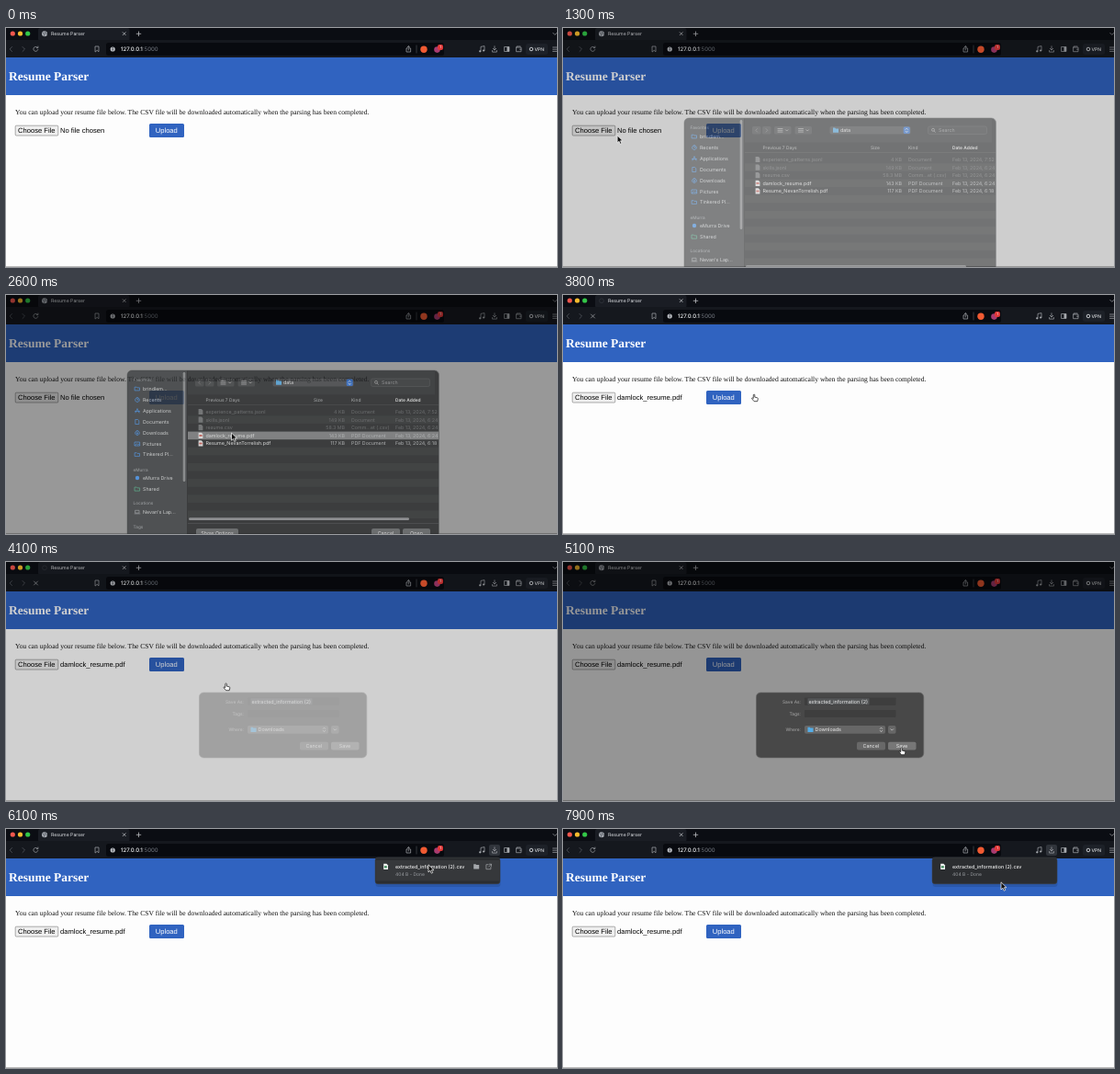
These frames come from a looping animation (600x260 px, 8 s). An HTML page:

```html
<!DOCTYPE html>
<html lang="en">
<head>
<meta charset="utf-8">
<title>Resume Parser</title>
<style>
html, body { margin: 0; width: 100%; height: 100%; overflow: hidden; background: #fdfdfd; }
svg { display: block; width: 600px; height: 260px; }
text { font-family: Inter, Roboto, sans-serif; text-rendering: geometricPrecision; white-space: pre; }
.serif { font-family: "Liberation Serif", serif; }
.arial { font-family: "Liberation Sans", sans-serif; }
.line { fill: none; stroke-linecap: round; stroke-linejoin: round; }
</style>
</head>
<body>
<svg id="stage" viewBox="0 0 600 260"></svg>
<script>
const LOOP = 8000, STEP = 100;

// Drawing helpers: text is placed by its vertical centre.
const attrs = o => Object.entries(o).map(([k, v]) => `${k}="${v}"`).join(' ');
const text = (x, y, str, size, fill, more = {}) =>
  `<text x="${x}" y="${(y + size * .36).toFixed(2)}" font-size="${size}" fill="${fill}" ${attrs(more)}>${str}</text>`;
const rect = (x, y, w, h, fill, rx = 0, more = {}) =>
  `<rect x="${x}" y="${y}" width="${w}" height="${h}" rx="${rx}" fill="${fill}" ${attrs(more)}/>`;
const dot = (x, y, r, fill, more = {}) => `<circle cx="${x}" cy="${y}" r="${r}" fill="${fill}" ${attrs(more)}/>`;
const line = (d, stroke = '#a5a8ad', w = .7) => `<path class="line" d="${d}" stroke="${stroke}" stroke-width="${w}"/>`;
const ring = (x, y, r, stroke, w = .7) => dot(x, y, r, 'none', { stroke, 'stroke-width': w });
const group = (id, body, more = {}) => `<g id="${id}" ${attrs(more)}>${body}</g>`;
const folder = (x, y, fill) => `<path d="M${x} ${y}h2.2l.8 .8h3v4.4h-6z" fill="${fill}"/>`;
const sheet = (x, y, fill) => `<path d="M${x} ${y}h3.2l1.6 1.6v4.6h-4.8z" fill="${fill}"/>`;
const end = { 'text-anchor': 'end' }, mid = { 'text-anchor': 'middle' }, semi = { 'font-weight': 500 };

function browser() {
  const lights = ['#f4574e', '#f8bb2e', '#33c748'].map((c, i) => dot(7.3 + i * 8.2, 6, 2.6, c)).join('');
  const globe = dot(42, 6.3, 3, '#a7abb2') + line('M40 5l2 1.4-.6 2M43 4l-.3 1.4 1.8 1.2', '#454a52', .8);
  const reload = line('M34.3 21.2a2.5 2.5 0 1 0 .5 2.4M34.9 20v1.6h-1.6');
  return rect(0, 0, 600, 14, '#0b0d13') + rect(35, 0, 99.5, 14, '#1a1d24', 2.5) +
    rect(0, 13, 600, 19, '#15181e') + rect(109, 16, 368, 14, '#080a0f', 2.5) + lights +
    group('globe', globe) +
    group('spinner', ring(42, 6.3, 2.4, '#30343b', .8)) +
    text(49, 6.4, 'Resume Parser', 5.2, '#dcdee2') +
    line('M127.2 4.7l3 3m0-3l-3 3M142.2 6.3h4.6m-2.3-2.3v4.6', '#d0d2d6') +
    line('M595.8 5.4l2 2 2-2') +
    line('M6.6 20.5l-2.5 2.5 2.5 2.5M18 20.5l2.5 2.5-2.5 2.5', '#5c6067') +
    group('reload', reload) + group('stop', line('M30.5 21l4 4m0-4l-4 4')) +
    line('M97.4 20h3.6v5.8l-1.8-1.5-1.8 1.5z') +
    dot(116.2, 23, 2.6, '#b8bbc0') + line('M116.2 22.8v1.2m0-2.5v.1', '#14171d', .8) +
    text(125, 23, '127.0.0.1<tspan fill="#70757d" font-weight="400">:5000</tspan>', 6.1, '#eceef0', semi) +
    line('M437 22h-1v4h4.6v-4h-1M438.3 24v-4.2m-1.4 1.2l1.4-1.3 1.4 1.3') +
    line('M447 19v8', '#555961', .6) + dot(455, 23.2, 3.7, '#f05a32') +
    dot(469.5, 23.6, 3.3, '#a83b70') + rect(470, 18, 6, 6, '#e23838', 2) + text(473, 21, '1', 4, '#fff', mid) +
    line('M517 25.2v-4.8l4-.8v4.8') + dot(516.2, 25.3, 1.1, '#a5a8ad') + dot(520.1, 24.5, 1.1, '#a5a8ad') +
    group('downloadActive', rect(526, 17, 12, 12, '#30343b', 2)) +
    line('M532 19.8v4.1m-1.7-1.6l1.7 1.7 1.7-1.7M529.6 24.5v1.6h4.8v-1.6') +
    line('M543 20.5h5v5h-5z') + rect(545.5, 20.5, 2.5, 5, '#a5a8ad') +
    line('M556 21h5v4.7h-5zM556 21v-1h4M559.5 23.2h1.5') +
    rect(566, 17, 24, 12, '#1d2128', 2.5) + ring(572, 23, 1.8, '#c7cacf', 1) +
    text(575.5, 23, 'VPN', 5, '#dfe1e4', semi) + line('M595.5 21h5m-5 2.2h5m-5 2.2h5');
}

function page() {
  const arial = { class: 'arial' };
  return rect(0, 32, 600, 41, '#3063c0') +
    text(3, 52.2, 'Resume Parser', 13.5, '#fff', { class: 'serif', 'font-weight': 700 }) +
    text(10, 91.5, 'You can upload your resume file below. The CSV file will be downloaded automatically when the parsing has been completed.',
      7.6, '#111', { class: 'serif' }) +
    rect(10.2, 106.2, 46.6, 10.8, '#efefef', 1, { stroke: '#767676', 'stroke-width': .6 }) +
    text(13, 111.5, 'Choose File', 7.6, '#000', arial) +
    text(59, 111.5, 'No file chosen', 7.6, '#000', { ...arial, id: 'fileName' }) +
    rect(156, 104, 38, 15, '#3063c0', 1.5) +
    text(174.8, 111.5, 'Upload', 7.6, '#fff', { ...arial, ...mid }) +
    rect(0, 259, 600, 1, '#bcbcbc');
}

const SIDEBAR = [
  ['Favorites', 92.5], ['brindlem...', 102], ['Recents', 114], ['Applications', 126], ['Documents', 138],
  ['Downloads', 150], ['Pictures', 162], ['Tinkered Pl...', 173.5], ['eMurra', 190], ['eMurra Drive', 199],
  ['Shared', 211], ['Locations', 226.5], ["Nevan's Lap...", 236], ['Tags', 252]
];
const HEADINGS = ['Favorites', 'eMurra', 'Locations', 'Tags'];
const ICONS = {
  Recents: 'M0-2.4a2.4 2.4 0 1 0 .01 0M0-1.2V0h1.2',
  Applications: 'M-2 2L0-2.4 2 2M-2.6 .6h5.2',
  Documents: 'M-1.8-2.5h2.4l1.2 1.2v3.8h-3.6z',
  Downloads: 'M0-2.4a2.4 2.4 0 1 0 .01 0M0-1.1v2.2m-1-.9l1 1 1-1',
  Pictures: 'M-2.6-2h5.2v4h-5.2zM-2.4 1.6l1.7-1.8 1.2 1 .9-.7 1 1',
  Shared: 'M-2.6-1.9h2l.7.8h2.5v3.2h-5.2z',
  "Nevan's Lap...": 'M-2-1.7h4v2.8h-4zM-2.9 1.9h5.8'
};
const FILES = [
  ['experience_patterns.jsonl', '4 KB', 'Document', '7:52'], ['skills.jsonl', '149 KB', 'Document', '6:24'],
  ['resume.csv', '58.3 MB', 'Comm...et (.csv)', '6:24'], ['damlock_resume.pdf', '143 KB', 'PDF Document', '6:24'],
  ['Resume_NevanTorrelish.pdf', '117 KB', 'PDF Document', '6:18']
];

function openDialog() {
  const side = SIDEBAR.map(([name, y]) => {
    if (HEADINGS.includes(name)) return text(138.5, y, name, 4.7, '#92969a', semi);
    const d = ICONS[name] || 'M-2.5-1.8h1.8l.7.7h2.5v3h-5z';
    const color = name === 'Shared' ? '#49b98b' : name.startsWith('Nevan') ? '#a0a4a8' : '#3c91f2';
    const icon = name === 'eMurra Drive' ? dot(143, y, 2.2, color)
      : `<g transform="translate(143 ${y})">${line(d, color)}</g>`;
    return icon + text(149, y, name, 5.3, '#dddfe0');
  }).join('');
  const rows = FILES.map(([name, size, kind, time], i) => {
    const y = 127 + i * 8.6, live = i > 2;
    const color = live ? '#f2f2f2' : '#626466', meta = live ? '#b8babc' : '#5c5e60';
    return sheet(209.6, y - 3.1, live ? '#f0eeee' : '#66686a') + (live ? rect(210.4, y - .8, 3.2, 1.8, '#cc5148') : '') +
      text(217.5, y, name, 5.35, color) + text(369, y, size, 5.3, meta, end) +
      text(376, y, kind, 5.3, meta) + text(424, y, `Feb 13, 2024, ${time}`, 5.3, meta);
  }).join('');
  const stripes = Array.from({ length: 7 }, (_, i) => rect(198, 131.3 + i * 17.2, 273, 8.6, '#222425')).join('');
  const head = [['Previous 7 Days', 217.5], ['Size', 335], ['Kind', 376]]
    .map(([s, x]) => text(x, 114.2, s, 4.9, '#b2b4b6')).join('') + text(424, 114.2, 'Date Added', 4.9, '#f0f0f0', { 'font-weight': 600 });
  const button = (x, w, s) => rect(x, 254, w, 10, '#5c5e60', 2) + text(x + w / 2, 258.8, s, 5.4, '#eee', mid);
  return rect(132, 82, 339.5, 190, '#191b1c', 5, { stroke: '#5a5c5e', 'stroke-width': .7 }) +
    `<path d="M197.5 82.4H137a4.6 4.6 0 0 0-4.6 4.6V270h65.1z" fill="#343739"/>` +
    rect(197.3, 82.4, .6, 188, '#101112') + rect(198, 82.4, 269, 26, '#222426') + stripes + side +
    rect(192.7, 84, 2.6, 119, '#85888a', 1.3) +
    rect(206, 91, 9.5, 8.5, '#37393b', 1.5) + rect(217, 91, 9.5, 8.5, '#37393b', 1.5) +
    line('M211.6 93.5l-1.8 1.8 1.8 1.8M221 93.5l1.8 1.8-1.8 1.8', '#777') +
    rect(230, 91, 18.5, 8.5, '#37393b', 1.5) + line('M234 93.5h5m-5 1.8h5m-5 1.8h5M242.5 94.8l1.2 1.2 1.2-1.2', '#bbb') +
    rect(252.5, 91, 18.5, 8.5, '#37393b', 1.5) + line('M256.5 93.5h5m-5 1.8h5m-5 1.8h5M265 94.8l1.2 1.2 1.2-1.2', '#bbb') +
    rect(290.5, 91, 88, 8.5, '#3d3f41', 1.8) + folder(294, 92.6, '#4da9e6') + text(302, 95.3, 'data', 5.4, '#eee') +
    rect(370.7, 91.5, 7, 7.5, '#2467ce', 1.5) + line('M373 94.4l1.2-1.3 1.2 1.3m-2.4 1.8l1.2 1.3 1.2-1.3', '#fff') +
    rect(397.5, 91, 64, 8.5, '#292b2d', 1.8, { stroke: '#4b4d4f', 'stroke-width': .5 }) +
    ring(403, 94.8, 1.5, '#a5a5a5') + line('M404.1 96l1.3 1.3', '#a5a5a5') + text(409, 95.3, 'Search', 5.3, '#8b8d8f') +
    head + rect(198, 119.2, 273, .5, '#3b3d3f') +
    group('selectedRow', rect(198, 148.6, 273, 8.6, '#77797a')) + rows +
    rect(199, 242.3, 240, 2.8, '#898b8d', 1.4) + rect(198, 248, 273, .5, '#45474a') +
    button(207, 46, 'Show Options') + button(398, 31, 'Cancel') + button(432, 30, 'Open');
}

function saveDialog() {
  const label = (s, y) => text(259, y, s, 4.9, '#aaa', end);
  return rect(210.3, 142, 182.5, 71, '#464646', 5, { stroke: '#696969', 'stroke-width': .6 }) +
    label('Save As:', 152) + label('Tags:', 165) + label('Where:', 182.3) +
    rect(263, 147.5, 99.5, 8.5, '#3c3c3c', .8) + rect(266.5, 148.3, 67, 7, '#535557') +
    text(267.5, 151.8, 'extracted_information (2)', 5.4, '#f0f0f0') +
    rect(263, 161, 99.5, 8, '#3c3c3c', .8) +
    rect(263, 178, 88, 8.8, '#666', 1.8) + folder(266.5, 179.8, '#52aeea') + text(274.5, 182.4, 'Downloads', 5.4, '#f0f0f0') +
    line('M345.3 181.4l1.2-1.3 1.2 1.3m-2.4 2l1.2 1.3 1.2-1.3', '#ddd') +
    rect(354, 178, 8.5, 8.8, '#666', 1.8) + line('M357 181.8l1.3 1.3 1.3-1.3', '#ddd') +
    rect(320, 195.7, 31, 8.8, '#676767', 1.8) + text(335.3, 200.1, 'Cancel', 5.4, '#eee', mid) +
    rect(354, 195.7, 30.5, 8.8, '#777', 1.8) + text(369, 200.1, 'Save', 5.4, '#f4f4f4', mid);
}

function popup() {
  return rect(402.5, 33, 136, 30, '#000', 3, { opacity: .12 }) +
    rect(402, 31, 136, 28.7, '#2b2d30', 3, { stroke: '#3e4043', 'stroke-width': .5 }) +
    group('rowHover', rect(402.3, 34, 135.4, 22.5, '#36383b')) +
    sheet(411.2, 37.8, '#f1f3f2') + rect(412, 40.2, 2.8, 2.2, '#3f8c5c') +
    text(424, 41, 'extracted_information (2).csv', 5.35, '#f0f0f0', semi) +
    text(424, 49, '404 B - Done', 5, '#999ca0') +
    group('rowTools', folder(509.2, 38.3, '#a4a7ab') + line('M525.2 38.7h-2.3v5h5v-2.3M526.3 38.2h2.2v2.2m0-2.2l-3 3'));
}

const arrow = '<path d="M0 0v8.2l1.9-1.8 1.3 3 1.5-.7-1.3-2.8h2.6z" fill="#111" stroke="#fff" stroke-width=".7"/>';
const hand = '<path d="M-.7 .5q.8-.9 1.5 0v2.6l3 .8q.7.3.5 1.2l-.6 2.6h-3.6l-2.4-2.9q-.3-1 .7-.9l.9.7z" fill="#fff" stroke="#111" stroke-width=".7" stroke-linejoin="round"/>';

document.getElementById('stage').innerHTML = rect(0, 0, 600, 260, '#fdfdfd') + page() + browser() +
  group('popup', popup()) + rect(0, 0, 600, 260, '#000', 0, { id: 'dim' }) +
  group('openDialog', openDialog()) + group('saveDialog', saveDialog()) +
  group('cursor', group('arrow', arrow) + group('hand', hand));

// Each step: time in ms, then one or more values.
const CURSOR = [
  [100, 245, 216], [500, 120, 150], [900, 36, 112], [1200, 36, 112], [1600, 128.5, 131.5], [1800, 150, 138],
  [2100, 251, 155], [2500, 251, 155], [2700, 240, 145], [3200, 184, 109], [3600, 184, 109], [3800, 208, 108],
  [4200, 250, 140], [4800, 368.5, 202], [5200, 368.5, 202], [5500, 390, 163], [6100, 460, 38.8],
  [7500, 460, 38.8], [7900, 477, 57.8]
];
const DIM = [[1100, 0], [1600, .47], [2400, .47], [2600, .4], [3000, 0], [3900, 0], [4400, .45], [5000, .45], [5100, .41], [5400, 0]];
const OPEN_FADE = [[1100, 0], [1500, 1], [2400, 1], [2600, .72], [2900, 0]];
const OPEN_SLIDE = [[1100, 24], [1600, 4], [1800, 0]];
const SAVE_FADE = [[4000, 0], [4300, 1], [5000, 1], [5100, .97], [5300, 0]];
const POPUP_FADE = [[5500, 0], [5700, 1]];

function sample(steps, t) {
  const next = steps.findIndex(s => s[0] > t);
  if (next === 0) return steps[0].slice(1);
  if (next < 0) return steps[steps.length - 1].slice(1);
  const a = steps[next - 1], b = steps[next], p = (t - a[0]) / (b[0] - a[0]);
  return a.slice(1).map((v, i) => v + (b[i + 1] - v) * p);
}

const part = id => document.getElementById(id);
const fade = (id, value) => part(id).setAttribute('opacity', value);
const show = (id, on) => part(id).style.display = on ? '' : 'none';
const move = (id, x, y) => part(id).setAttribute('transform', `translate(${x} ${y})`);

function render(t) {
  const loading = t >= 3500 && t < 4300;
  const pointing = t >= 3300 && t < 5300;
  const overRow = t >= 5900 && t < 7800;
  fade('dim', sample(DIM, t));
  fade('openDialog', sample(OPEN_FADE, t));
  fade('saveDialog', sample(SAVE_FADE, t));
  fade('popup', sample(POPUP_FADE, t));
  move('openDialog', 0, sample(OPEN_SLIDE, t)[0]);
  move('cursor', ...sample(CURSOR, t));
  show('cursor', t >= 100);
  show('arrow', !pointing);
  show('hand', pointing);
  show('selectedRow', t >= 2100);
  show('globe', !loading);
  show('reload', !loading);
  show('spinner', loading);
  show('stop', loading);
  show('downloadActive', t >= 5600);
  show('rowHover', overRow);
  show('rowTools', overRow);
  part('fileName').textContent = t < 2800 ? 'No file chosen' : 'damlock_resume.pdf';
}

const start = performance.now();
function tick() {
  const t = (performance.now() - start) % LOOP;
  render(Math.floor(t / STEP) * STEP);
  requestAnimationFrame(tick);
}
tick();
</script>
</body>
</html>
```
